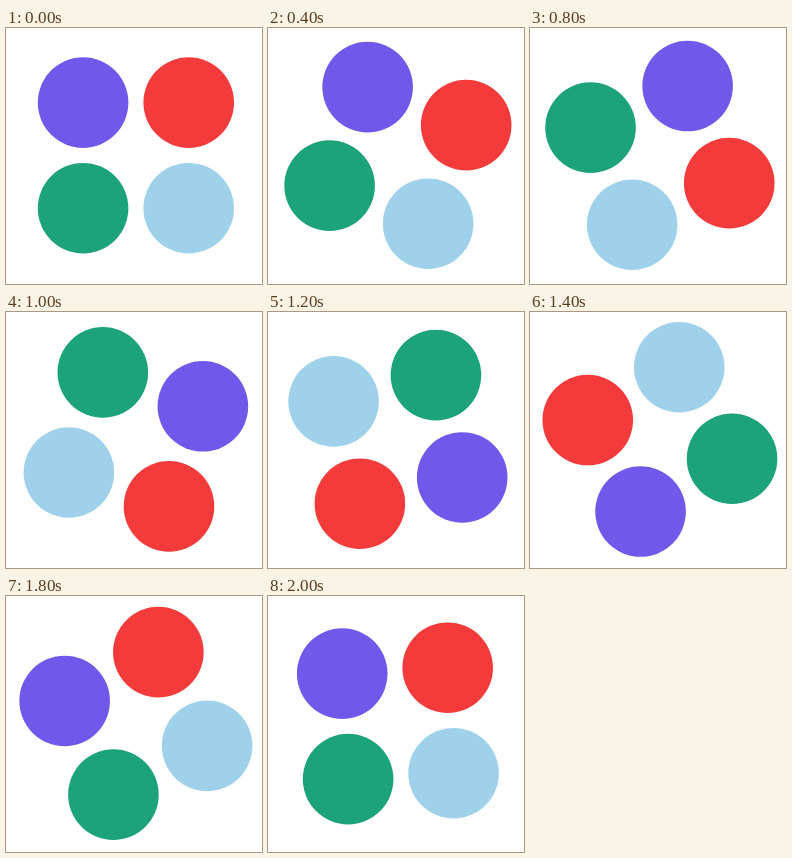
Write an HTML page with a canvas that moves like this. It is 256x256 px and loops after 2100 ms.

```html
<!DOCTYPE html>
<html lang="en">
<head>
<meta charset="utf-8">
<title>Turning dots</title>
<style>
  html, body { margin: 0; width: 100%; height: 100%; overflow: hidden; background: #fff; }
  canvas { display: block; width: 256px; height: 256px; }
</style>
</head>
<body>
<canvas id="stage"></canvas>
<script>
const SIZE = 256, STEP = 100, STEPS = 21;
const CX = 129.9, CY = 127.4, ORBIT = 74.7, RADIUS = 45.3;

// clockwise from the top left
const COLORS = ['#7059ea', '#f43b3b', '#9fd2ea', '#1ca37a'];

// [step, turn in degrees]: slow start, fast middle, soft landing
const KEYS = [[0, 0], [4, 21.1], [8, 66.8], [12, 165.6], [14, 240],
              [16, 295.1], [18, 332.5], [20, 356.8]];

const canvas = document.getElementById('stage');
const ctx = canvas.getContext('2d');
const ratio = window.devicePixelRatio || 1;
canvas.width = canvas.height = Math.round(SIZE * ratio);
ctx.scale(ratio, ratio);

// keys repeat every loop, one full turn further on
function key(i) {
  const n = KEYS.length, lap = Math.floor(i / n);
  const [step, deg] = KEYS[i - lap * n];
  return [step + lap * STEPS, deg + lap * 360];
}

function slope(i) {
  const [x0, y0] = key(i), [x1, y1] = key(i + 1);
  return (y1 - y0) / (x1 - x0);
}

function tangent(i) {
  const before = key(i)[0] - key(i - 1)[0];
  const after = key(i + 1)[0] - key(i)[0];
  return (slope(i - 1) * after + slope(i) * before) / (before + after);
}

// smooth Hermite curve through the keys
function turnAt(step) {
  let i = 0;
  while (key(i + 1)[0] <= step) i++;
  const [x0, y0] = key(i), [x1, y1] = key(i + 1);
  const h = x1 - x0, u = (step - x0) / h, v = 1 - u;
  return y0 * (1 + 2 * u) * v * v + y1 * (3 - 2 * u) * u * u
       + h * u * v * (tangent(i) * v - tangent(i + 1) * u);
}

function draw(ms) {
  const turn = turnAt(Math.floor(ms / STEP) % STEPS);
  ctx.fillStyle = '#fff';
  ctx.fillRect(0, 0, SIZE, SIZE);
  COLORS.forEach((color, i) => {
    const a = (225 + 90 * i + turn) * Math.PI / 180;
    ctx.fillStyle = color;
    ctx.beginPath();
    ctx.arc(CX + ORBIT * Math.cos(a), CY + ORBIT * Math.sin(a), RADIUS, 0, Math.PI * 2);
    ctx.fill();
  });
}

const start = performance.now();
function tick() {
  draw(Math.max(0, performance.now() - start));
  requestAnimationFrame(tick);
}
tick();
</script>
</body>
</html>
```
